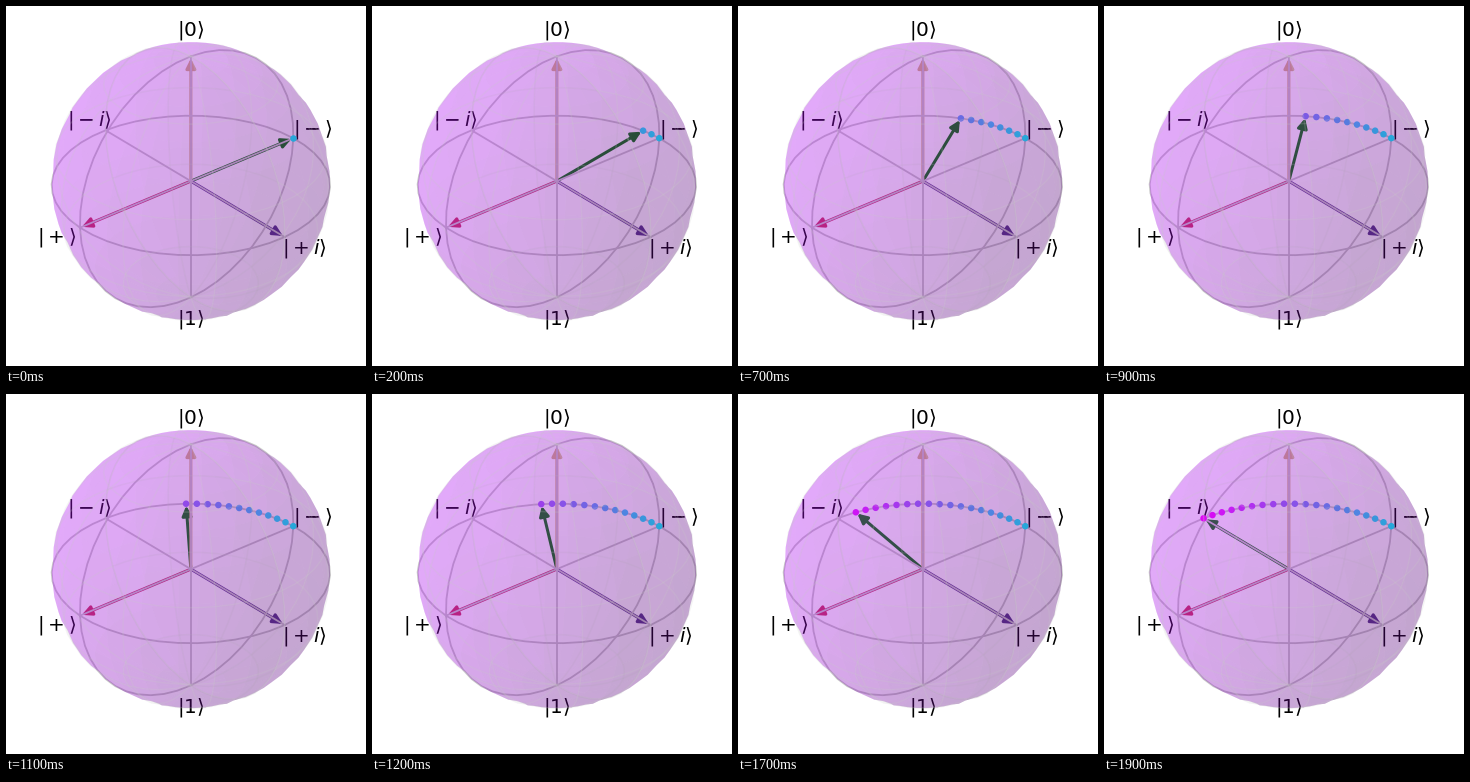
Write a matplotlib script that moves like this. It is 360 px wide and 360 px high and loops after 2000 ms.

```python
import numpy as np
import matplotlib.pyplot as plt
from matplotlib.animation import FuncAnimation
from matplotlib.collections import LineCollection, PolyCollection
from matplotlib.patches import FancyArrowPatch

SIZE, DPI = 360, 72
FRAMES, INTERVAL = 20, 100
DIST, SPAN = 10, 1.4
SCALE = SIZE * DIST / 1.85
CENTER = SIZE * 0.95 / 1.85, SIZE * 0.9 / 1.85

SPHERE = np.array([178, 18, 245]) / 255
SPHERE_ALPHA, WIRE_ALPHA = 0.2, 0.2
FRAME = "#c8c8c8"
FRAME_WIDTH = 1.8

AZ, EL = np.radians([-40, 30])
RIGHT = np.array([-np.sin(AZ), np.cos(AZ), 0])
UP = np.array([-np.sin(EL) * np.cos(AZ), -np.sin(EL) * np.sin(AZ), np.cos(EL)])
TOWARD = np.array([np.cos(EL) * np.cos(AZ), np.cos(EL) * np.sin(AZ), np.sin(EL)])
LIGHT = np.array([-2, -2, 1]) / 3

# Basis states in plot coordinates
ZERO, PLUS, PLUS_I = np.array([[0, 0, 1], [0, -1, 0], [1, 0, 0]])


def project(points):
    """Perspective projection of 3D points to stage pixels."""
    p = np.asarray(points, float) / SPAN
    k = SCALE / (DIST - p @ TOWARD)
    return np.stack([CENTER[0] + k * (p @ RIGHT), CENTER[1] - k * (p @ UP)], axis=-1)


def line(points):
    ax.plot(*project(points).T, color=FRAME, lw=FRAME_WIDTH, zorder=2)


def arrow(tip, color):
    patch = FancyArrowPatch(*project([[0, 0, 0], tip]), arrowstyle="-|>",
                            mutation_scale=20, lw=3, color=color, zorder=1)
    ax.add_patch(patch)
    return patch


def hemisphere(start, zorder):
    """Shaded half sphere with its faint wire grid."""
    u = np.linspace(start, start + np.pi, 25)
    v = np.linspace(0, np.pi, 25)
    grid = np.stack([np.outer(np.cos(u), np.sin(v)),
                     np.outer(np.sin(u), np.sin(v)),
                     np.outer(np.ones(25), np.cos(v))], axis=-1)
    patches, shade = [], []
    for i in range(0, 24, 2):
        for j in range(0, 24, 2):
            edge = np.concatenate([grid[i, j:j + 2], grid[i:i + 2, j + 2],
                                   grid[i + 2, j + 2:j:-1], grid[i + 2:i:-1, j]])
            patches.append(project(edge))
            shade.append(grid[i + 1, j + 1] @ LIGHT)
    shade = np.array(shade)
    shade = 0.5 + 0.5 * (shade - shade.min()) / np.ptp(shade)
    ax.add_collection(PolyCollection(patches, facecolors=shade[:, None] * SPHERE,
                                     alpha=SPHERE_ALPHA, linewidths=0, zorder=zorder))
    steps = [0, 5, 10, 15, 20, 24]
    wires = [project(grid[k]) for k in steps] + [project(grid[:, k]) for k in steps]
    ax.add_collection(LineCollection(wires, colors=FRAME, alpha=WIRE_ALPHA,
                                     linewidths=1.5, zorder=zorder + 1))


fig = plt.figure(figsize=(SIZE / DPI, SIZE / DPI), dpi=DPI, facecolor="white")
ax = fig.add_axes([0, 0, 1, 1])
ax.set_xlim(0, SIZE)
ax.set_ylim(SIZE, 0)
ax.axis("off")
ax.set_autoscale_on(False)

# Great circles and axes
turn = np.linspace(0, 2 * np.pi, 49)
c, s, o = np.cos(turn), np.sin(turn), 0 * turn
line(np.stack([c, s, o], axis=-1))
line(np.stack([o, c, s], axis=-1))
for axis in (ZERO, PLUS, PLUS_I):
    line([-axis, axis])

# Labels sit just outside the sphere, below its translucent skin
labels = [(ZERO, "0"), (-ZERO, "1"), (PLUS, "+"), (-PLUS, "-"),
          (PLUS_I, "+i"), (-PLUS_I, "-i")]
for where, name in labels:
    x, y = project(1.2 * where)
    ax.text(x, y, rf"$|{name}\rangle$", fontsize=20, color="black",
            ha="center", va="center", zorder=3)

# The state swings a quarter turn along the equator
angle = np.linspace(0, np.pi / 2, FRAMES)
path = np.stack([-np.sin(angle), np.cos(angle), 0 * angle], axis=-1)
trail = project(path)
hues = plt.cm.cool(np.linspace(0, 1, FRAMES))

state = arrow(path[0], "#007300")
arrow(ZERO, "#d4b482")
arrow(PLUS_I, "#513785")
arrow(PLUS, "#c92d58")
dots = ax.scatter(trail[:1, 0], trail[:1, 1], s=25, lw=1.5, color=hues[:1], zorder=4)

hemisphere(0, 5)
hemisphere(-np.pi, 7)


def update(i):
    state.set_positions(project([0, 0, 0]), trail[i])
    dots.set_offsets(trail[:i + 1])
    dots.set_color(hues[:i + 1])
    return state, dots


anim = FuncAnimation(fig, update, frames=FRAMES, interval=INTERVAL,
                     init_func=lambda: update(0), repeat=True)
plt.show()
```
